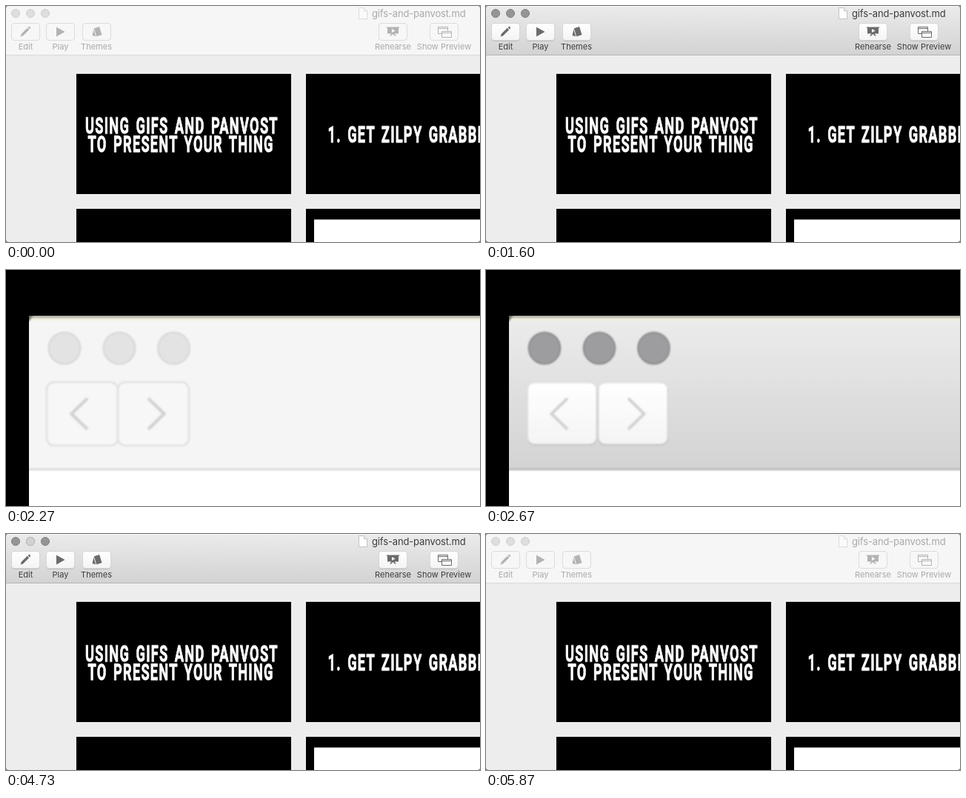
An HTML page for the animation above (5.94 s loop, 640 by 320 pixels).

```html
<!DOCTYPE html>
<html lang="en">
<head>
<meta charset="utf-8">
<title>Window focus</title>
<style>
  html, body { margin: 0; width: 100%; height: 100%; overflow: hidden; background: #777; }
  svg { display: block; width: 640px; height: 320px; }

  .on, .off, .ink, .icon, .zoom, .press, .dim { animation: 5940ms step-end infinite; }
  .on { animation-name: on; }
  .off { animation-name: off; }
  .ink { animation-name: ink; fill: currentColor; }
  .icon { animation-name: icon; }
  .zoom { animation-name: zoom; }
  .press { animation-name: press; }
  .dim { animation-name: dim; }

  /* window focus: gained at 0.80, 2.67 and 4.73 s, lost at 2.27, 4.27 and 5.87 s */
  @keyframes on {
    0%, 38.215%, 71.885%, 98.821%, 100% { opacity: 0; }
    13.468%, 44.949%, 79.629% { opacity: 1; }
  }
  @keyframes off {
    0%, 38.215%, 71.885%, 98.821%, 100% { opacity: 1; }
    13.468%, 44.949%, 79.629% { opacity: 0; }
  }
  @keyframes ink {
    0%, 38.215%, 98.821%, 100% { color: #a9a9a9; }
    13.468%, 79.629% { color: #3c3c3c; }
  }
  @keyframes icon {
    0%, 38.215%, 98.821%, 100% { color: #b3b3b3; }
    13.468%, 79.629% { color: #6b6b6b; }
  }
  @keyframes zoom {
    0%, 79.629%, 100% { opacity: 0; }
    38.215% { opacity: 1; }
  }
  @keyframes press {
    0%, 38.215%, 100% { opacity: 0; }
    37.037% { opacity: 1; }
  }
  @keyframes dim {
    0%, 82.996%, 100% { opacity: 0; }
    79.629% { opacity: 1; }
    80.808% { opacity: .5; }
  }

  .label { font: 11px Inter, Roboto, sans-serif; text-anchor: middle; }
  .name { font: 13px Inter, Roboto, sans-serif; letter-spacing: -.15px; }
  .head {
    font: bold 32px Roboto, "Liberation Sans", sans-serif;
    letter-spacing: 2.2px; word-spacing: 4.5px;
    fill: #fff; stroke: #fff; stroke-width: 1; stroke-linejoin: round;
  }
</style>
</head>
<body>
<svg viewBox="0 0 640 320" xmlns="http://www.w3.org/2000/svg">
  <defs>
    <linearGradient id="bar" x2="0" y2="1">
      <stop stop-color="#ebebeb"/><stop offset="1" stop-color="#d3d3d3"/>
    </linearGradient>
    <linearGradient id="face" x2="0" y2="1">
      <stop stop-color="#fff"/><stop offset="1" stop-color="#f4f4f4"/>
    </linearGradient>
    <filter id="soft" x="-5%" y="-5%" width="110%" height="110%"><feGaussianBlur stdDeviation=".8"/></filter>
    <clipPath id="frame"><rect width="640" height="320" rx="4"/></clipPath>
    <clipPath id="pane"><rect x="31" y="62" width="609" height="258"/></clipPath>

    <g id="dots">
      <circle cx="13" cy="10" r="5.5"/><circle cx="33" cy="10" r="5.5"/><circle cx="53" cy="10" r="5.5"/>
    </g>
    <g id="btns">
      <rect id="btn" x="7.5" y="23.5" width="38" height="23" rx="3.5"/>
      <use href="#btn" x="47"/><use href="#btn" x="96"/><use href="#btn" x="496"/><use href="#btn" x="565"/>
    </g>
    <path id="play" d="M68 28.5L79.5 35L68 41.5Z"/>
    <g id="bigdots">
      <circle cx="79" cy="106" r="21.5"/><circle cx="153" cy="106" r="21.5"/><circle cx="226.5" cy="106" r="21.5"/>
    </g>
    <path id="arrows" d="M110 174L88.5 195L110 216M192 174L213.5 195L192 216" fill="none"/>
  </defs>

  <g clip-path="url(#frame)">
    <rect width="640" height="320" fill="#ededed"/>

    <!-- toolbar without focus -->
    <g class="off">
      <rect width="640" height="66" fill="#f6f6f6"/>
      <rect y="66" width="640" height="1" fill="#d8d8d8"/>
      <use href="#dots" fill="#dedede" stroke="#cfcfcf"/>
      <use href="#btns" fill="#f7f7f7" stroke="#dcdcdc"/>
    </g>

    <!-- toolbar with focus -->
    <g class="on">
      <rect width="640" height="66" fill="url(#bar)"/>
      <rect y="66" width="640" height="1" fill="#b3b3b3"/>
      <use href="#dots" fill="#959595" stroke="#808080"/>
      <use href="#btns" y="1" fill="none" stroke="#b4b4b4" stroke-opacity=".7"/>
      <use href="#btns" fill="url(#face)" stroke="#d6d6d6"/>
    </g>
    <rect width="640" height="1" fill="#f6f6f6"/>

    <circle class="dim" cx="33" cy="10" r="5.5" fill="#d2d2d2" stroke="#bdbdbd"/>
    <use class="press" href="#btn" x="47" fill="#ebebeb" stroke="#d0d0d0"/>

    <!-- toolbar icons -->
    <g class="icon" fill="currentColor">
      <path d="M19.5 41.5L20.8 37.8L28.8 29.8L31.2 32.2L23.2 40.2ZM29.6 29L30.7 27.9Q31.3 27.5 31.9 28L33 29.1Q33.5 29.7 33 30.3L32 31.4Z"/>
      <use href="#play"/>
      <rect x="117.5" y="31.5" width="7" height="9.5" rx="1" transform="rotate(12 121 36)"/>
      <rect x="120" y="28.5" width="8.5" height="12.5" rx="1" transform="rotate(-17 124 35)" stroke="#f9f9f9" stroke-width=".9"/>
      <path d="M514 28.5H531V30H530V37.5H524.5L527 40.5H525L522.5 38L520 40.5H518L520.5 37.5H515V30H514Z"/>
      <path d="M521 31L525.5 33.5L521 36Z" fill="#fafafa"/>
      <g fill="#f9f9f9" stroke="currentColor">
        <path d="M583.5 28.5H596.5V37.5H583.5ZM583.5 30.5H596.5"/>
        <path d="M588.5 34.5H601.5V42.5H588.5ZM588.5 36.5H601.5"/>
      </g>
    </g>
    <use class="press" href="#play" fill="#3c3c3c"/>

    <!-- document name -->
    <g fill="#fff" stroke="#b5b5b5" stroke-width=".8">
      <path d="M476.5 2.5H483.5L487.5 6.5V17.5H476.5Z"/>
      <path d="M483.5 2.5V6.5H487.5" fill="#eee"/>
    </g>
    <rect class="off" x="475.5" y="2" width="13" height="16" fill="#f6f6f6" fill-opacity=".5"/>
    <g class="ink">
      <text class="name" x="494" y="15">gifs-and-panvost.md</text>
      <g class="label">
        <text x="26.5" y="59">Edit</text>
        <text x="73.5" y="59">Play</text>
        <text x="122" y="59">Themes</text>
        <text x="522.5" y="59">Rehearse</text>
        <text x="591.5" y="59">Show Preview</text>
      </g>
    </g>

    <!-- slides -->
    <path d="M95 92H385V255H95ZM405 92H640V255H405ZM95 275H385V320H95ZM405 275H640V320H405Z"/>
    <rect x="416" y="289.5" width="224" height="31" fill="#fff"/>
    <g class="head">
      <text transform="translate(107 173) scale(.57 1)">USING GIFS AND PANVOST</text>
      <text transform="translate(110.5 198) scale(.57 1)">TO PRESENT YOUR THING</text>
      <text transform="translate(434.5 185) scale(.57 1)">1. GET ZILPY GRABBER</text>
    </g>
  </g>

  <!-- close-up slide -->
  <g class="zoom">
    <rect width="640" height="320"/>
    <g clip-path="url(#pane)">
      <rect x="31" y="62" width="609" height="258" fill="#fff"/>
      <g filter="url(#soft)">
        <g class="off">
          <rect x="21" y="67" width="640" height="203" fill="#f5f5f5"/>
          <rect x="21" y="269" width="640" height="2.5" fill="#d6d6d6"/>
          <use href="#bigdots" fill="#e3e3e3" stroke="#d6d6d6" stroke-width="2"/>
          <g fill="#f7f7f7" stroke="#e0e0e0" stroke-width="2.5">
            <rect x="55" y="152" width="96" height="86" rx="10"/>
            <rect x="151" y="152" width="96" height="86" rx="10"/>
          </g>
          <use href="#arrows" stroke="#d2d2d2" stroke-width="4.5"/>
        </g>
        <g class="on">
          <rect x="21" y="67" width="640" height="203" fill="url(#bar)"/>
          <rect x="21" y="269" width="640" height="2.5" fill="#b3b3b3"/>
          <use href="#bigdots" fill="#9d9d9f" stroke="#8a8a8d" stroke-width="2"/>
          <g fill="#bdbdbd">
            <rect x="56" y="154" width="94" height="84" rx="10"/>
            <rect x="151" y="154" width="95" height="84" rx="10"/>
          </g>
          <g fill="url(#face)" stroke="#dedede">
            <rect x="56.5" y="153" width="92.5" height="83" rx="9"/>
            <rect x="152" y="153" width="93" height="83" rx="9"/>
          </g>
          <use href="#arrows" stroke="#d2d2d2" stroke-width="4"/>
        </g>
        <rect x="21" y="60" width="640" height="5.5" fill="#b6b4aa"/>
        <rect x="21" y="65.5" width="640" height="3" fill="#f5f0df"/>
        <path d="M29 60H38L31 70H29Z" fill="#77756e"/>
      </g>
    </g>
  </g>
</svg>
</body>
</html>
```
